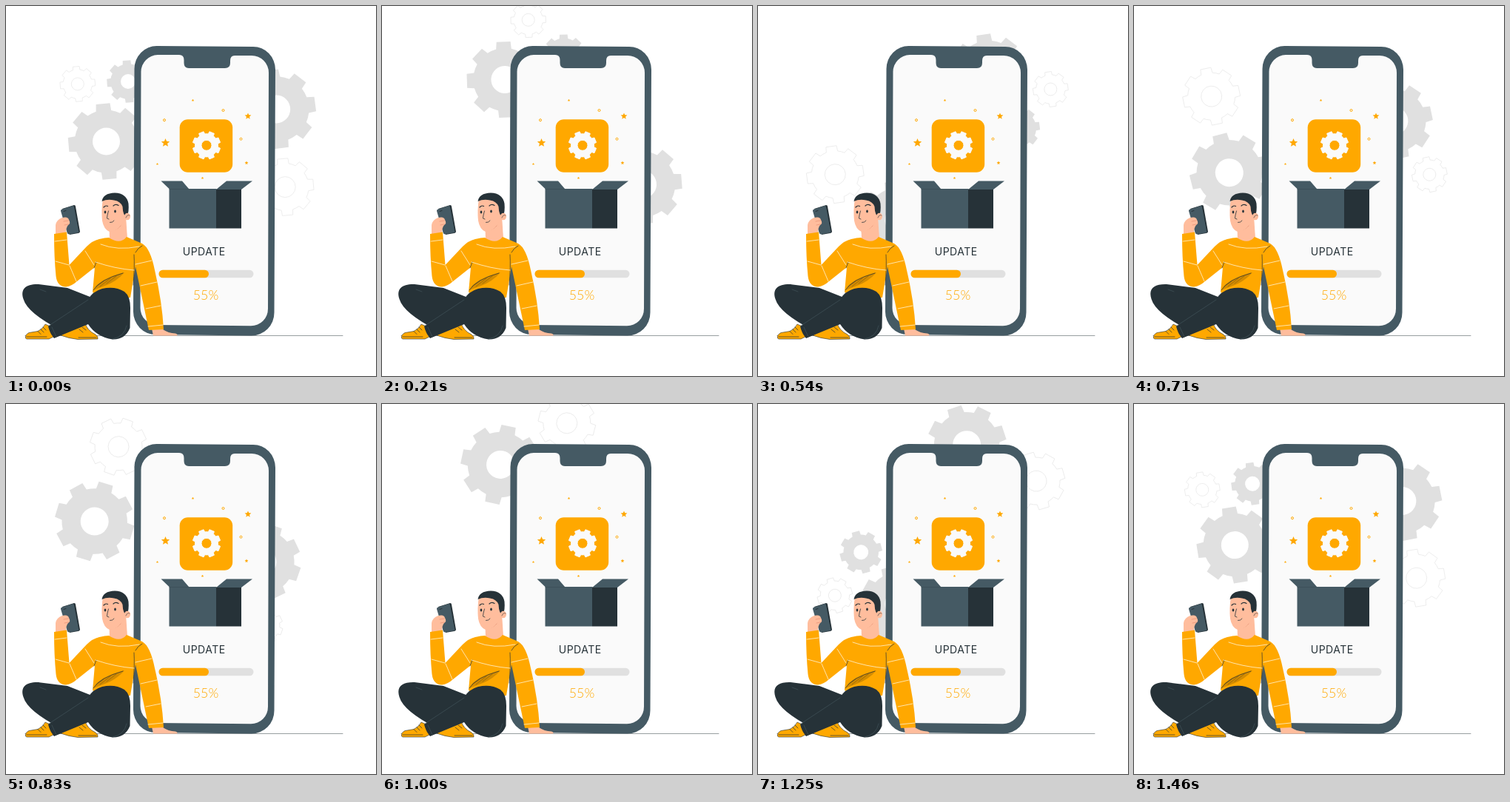
An HTML page for the animation above (1.5 s loop, 500 by 500 pixels).

```html
<!DOCTYPE html>
<html lang="en">
<head>
<meta charset="utf-8">
<title>Update</title>
<style>
  html, body { margin: 0; width: 100%; height: 100%; overflow: hidden; background: #fff; }
  svg { display: block; width: 100vw; height: 100vh; }
  .slate { fill: #455a64; }
  .dark { fill: #263238; }
  .gold { fill: #ffa800; }
  .skin { fill: #ffbd9d; }
  .grey { fill: #e0e0e0; }
  .pale { fill: #fafafa; }
  .line { fill: none; stroke-linecap: round; stroke-linejoin: round; }
</style>
</head>
<body>
<svg viewBox="0 0 500 500">
  <g id="gears"></g>

  <path class="line" d="M26 445.500H455" stroke="#6b7478" stroke-width=".7"/>

  <g id="phone">
    <path class="slate" d="M204 54L334 55A30 31 0 0 1 364 86L362.500 414A31 31 0 0 1 331 445.500L202 444A30 31 0 0 1 172 413L173.500 85A30 31 0 0 1 204 54Z"/>
    <path class="pale" d="M205 66H234Q240.500 66 240.500 73V77Q240.500 84 247 84H296Q303 84 303 77V74Q303 67 309 67H332A23 23 0 0 1 355 90L354 409A23 23 0 0 1 331 432.300L204 431A23 23 0 0 1 181.500 408L182.500 89A23 23 0 0 1 205 66Z"/>
  </g>

  <g id="app">
    <rect class="gold" x="234.700" y="153.200" width="71.500" height="71.500" rx="11"/>
    <g id="sparks"></g>
  </g>

  <g id="box">
    <path class="slate" d="M220.500 247H284V300.500H220.500Z"/>
    <path class="dark" d="M284 247.500H318V300.500H284Z"/>
    <path class="slate" d="M209.500 236.500H238L247.500 247.500H221ZM298 236.500H333L318 248H284Z"/>
    <path class="line" d="M221 247.500H247" stroke="#37474f" stroke-width=".5"/>
  </g>

  <text class="dark" x="267.700" y="337" text-anchor="middle" font-family="Inter, Roboto, sans-serif" font-size="14" letter-spacing=".5">UPDATE</text>
  <rect class="grey" x="206.500" y="356.800" width="128" height="10.400" rx="5.200"/>
  <rect class="gold" x="206.500" y="356.800" width="67.500" height="10.400" rx="5.200"/>
  <text class="gold" x="270" y="397" text-anchor="middle" font-family="Lato, 'Open Sans', sans-serif" font-size="17.800" font-weight="300">55%</text>

  <g id="man">
    <!-- shoes -->
    <g class="gold" stroke="#263238" stroke-width=".6">
      <path d="M26.500 449Q25.500 444 31 441.500L43 439.500Q50 436 53 430L62 434L66 446L58 450H28Z"/>
      <path d="M84 438L107 428Q109 438 121 444Q125 447 124 450L97 450.500Q84 449 74 445Z"/>
    </g>
    <path class="line" d="M43 439.500l4 4M47 437l4 4M50 434l4 4M99 437l5 4M103 434l5 4M28 447H55M98 448H122" stroke="#263238" stroke-width=".7"/>

    <!-- neck and head -->
    <path class="skin" d="M139.500 298L140 317Q153 324 164 314L162 284Z"/>
    <path class="line" d="M141 304Q150 303 155 297" stroke="#e58f73" stroke-width="1"/>
    <path class="skin" d="M131 260Q128.500 276 130 290Q132 302 140 305Q149 306 157 294L163 280L158 259Z"/>
    <path class="dark" d="M129.500 264Q131 253 147 252.500Q163 253 165.500 267Q166.500 278 163.500 285Q158 284 157.500 271Q155 264 146 262.500Q137 260.500 129.500 264Z"/>
    <ellipse class="skin" cx="164" cy="284.500" rx="4" ry="4.800"/>
    <path class="line" d="M162 286Q164 281 167 283" stroke="#263238" stroke-width=".6"/>
    <path class="line" d="M132 272Q134.500 269 137.500 270.500M145 270Q148 267 152 269.500" stroke="#263238" stroke-width="1.200"/>
    <path class="line" d="M138.500 277Q136.500 284 136.500 287L139 288M140.500 292.500Q144 293 146 290" stroke="#263238" stroke-width=".8"/>
    <ellipse class="dark" cx="134" cy="278.500" rx="1.300" ry="1.900"/>
    <ellipse class="dark" cx="147.500" cy="277.500" rx="1.300" ry="1.900"/>

    <!-- hand and handset -->
    <path class="dark" d="M76 274L92 269Q94 269 94 271L100 305Q99.500 307 97.500 307L86 309Z"/>
    <path class="slate" d="M75 275L90 270Q92 270 92 272L98.500 306L85 308.500Q83 308 82.500 306L74 277Q74 275 75 275Z"/>
    <path class="line" d="M78 277.500L81 276.500" stroke="#263238"/>
    <path class="skin" d="M67 308L67 296Q68 289 76 286Q84 284 85 289Q88 294 84 296Q81 299 81 308Z"/>
    <path class="line" d="M78 291L84 290M79 296L84 295" stroke="#e58f73" stroke-width=".7"/>
    <path class="skin" d="M197 436L212 437Q219 442 229 442.500Q233 444 231 445.500H199Z"/>

    <!-- sweater -->
    <path class="gold" d="M139 313Q134 313 126 315Q117 317 109 325L85.500 350L82 305.500L65 308Q65 340 67.500 365Q69 379 81 379.500Q89 378.500 96 372L120 353L117 387Q140 398 168 394L175 352L193 438L213 437Q211 400 201 357Q195 327 184 321L163 312Q154 323 139 313Z"/>
    <path d="M118 384Q124 373 139 367Q152 361.500 160 360Q150 372 134 378Z" fill="#d48c00"/>
    <path class="line" d="M122 379L132 372M127 379L141 368M136 375L149 365" stroke="#7d5a14" stroke-width=".6"/>
    <path class="line" d="M173 336Q174 352 172 377M119 354L122 346M175 333Q178 327 184 324M118 384Q126 370 158 361" stroke="#263238" stroke-width=".7"/>
    <path class="line" d="M66 318L82 316M67 345L85 350M86 351L95 372M107 331L119 350M121 346Q147 355 173 357M128 322Q150 331 180 325M175 349L197 344M182 378L204 373M189 409L209 405M192 433L212 431" stroke="#fff3d6" stroke-width=".8"/>

    <!-- legs -->
    <path class="dark" d="M23.500 396C19 382 27 375.500 44 376L83 381L116 394L114 426L94 436L74 438Q29 415 23.500 396Z"/>
    <path class="dark" d="M111 397Q116 386 130 382Q147 378 160 386Q168 392 168 408L167.500 435Q161 451 144 450.500Q122 447 111 430L65 449Q59 442 57 433Z"/>
    <path class="line" d="M111 397L58 432M46 383L54 386M62 434L68 447M144 450Q160 447 163 432" stroke="#46585f" stroke-width=".6"/>
  </g>
</svg>
<script>
const NS = 'http://www.w3.org/2000/svg';
const LOOP = 1500, FPS = 24, LAST = 35;
const CX = 244.5, CY = 175.4;
const GOLD = '#ffa800';
const $ = id => document.getElementById(id);

function add(parent, tag, attrs) {
  const el = document.createElementNS(NS, tag);
  for (const k in attrs) el.setAttribute(k, attrs[k]);
  parent.appendChild(el);
  return el;
}

function polar(x, y, r, deg) {
  const a = deg * Math.PI / 180;
  return (x + r * Math.cos(a)).toFixed(2) + ' ' + (y + r * Math.sin(a)).toFixed(2);
}

// Eight blunt teeth around a round hole
function gearPath(x, y, r, hole, phase) {
  const root = r * 0.82;
  let d = '';
  for (let i = 0; i < 8; i++) {
    const a = phase + i * 45;
    d += (i ? `A${root} ${root} 0 0 1 ` : 'M') + polar(x, y, root, a - 14) +
      'L' + polar(x, y, r, a - 10.5) + 'L' + polar(x, y, r, a + 10.5) +
      'L' + polar(x, y, root, a + 14);
  }
  d += `A${root} ${root} 0 0 1 ${polar(x, y, root, phase - 14)}Z`;
  return d + `M${x + hole} ${y}a${hole} ${hole} 0 1 0 ${-2 * hole} 0a${hole} ${hole} 0 1 0 ${2 * hole} 0Z`;
}

function gear(parent, x, y, r, hole, phase, paint) {
  add(parent, 'path', { d: gearPath(x, y, r, hole, phase), 'fill-rule': 'evenodd', ...paint });
}

function star(x, y, r) {
  let d = '';
  for (let i = 0; i < 10; i++) d += (i ? 'L' : 'M') + polar(x, y, i % 2 ? r * 0.45 : r, i * 36 - 90);
  add($('sparks'), 'path', { d: d + 'Z', fill: GOLD });
}

const solid = { fill: '#e0e0e0' };
const thin = { fill: 'none', stroke: '#e6e6e6', 'stroke-width': 0.7 };
const badge = { fill: '#fafafa', stroke: '#fafafa', 'stroke-linejoin': 'round' };
gear($('gears'), 135.5, 183, 52, 18.5, -5, solid);
gear($('gears'), 165, 102, 29, 10, -4, solid);
gear($('gears'), 365.2, 139.4, 54, 19, -7.5, solid);
gear($('gears'), 96.8, 105.4, 24, 8.5, -5, thin);
gear($('gears'), 377.2, 244.6, 39, 14, -5, thin);
gear($('sparks'), 271, 188.3, 19, 7, 22.5, badge);

[[215.5, 185, 6], [327, 149, 4.6], [325, 212, 2.6], [252.5, 127.5, 1.8],
 [204.5, 213.5, 1.7], [265.5, 232.5, 1.8]].forEach(s => star(...s));
[[293.5, 141], [214, 154.2], [317.5, 179.7]].forEach(([cx, cy]) =>
  add($('sparks'), 'circle', { cx, cy, r: 1.5, fill: 'none', stroke: GOLD, 'stroke-width': 1 }));

// Nearly steady spin: [step, degrees]
const spin = [[0, 0], [5, 48], [13, 132], [20, 204.3], [24, 244.5], [30, 304], [LAST, 356]];

function angleAt(step) {
  const i = Math.max(1, spin.findIndex(k => k[0] >= step));
  const [s0, a0] = spin[i - 1], [s1, a1] = spin[i];
  return a0 + (a1 - a0) * (step - s0) / (s1 - s0);
}

function draw(ms) {
  const step = Math.min(LAST, Math.floor((ms % LOOP + 5) * FPS / 1000));
  $('gears').setAttribute('transform', `rotate(${angleAt(step)} ${CX} ${CY})`);
}

function tick() {
  draw(performance.now());
  requestAnimationFrame(tick);
}
draw(0);
requestAnimationFrame(tick);
</script>
</body>
</html>
```
